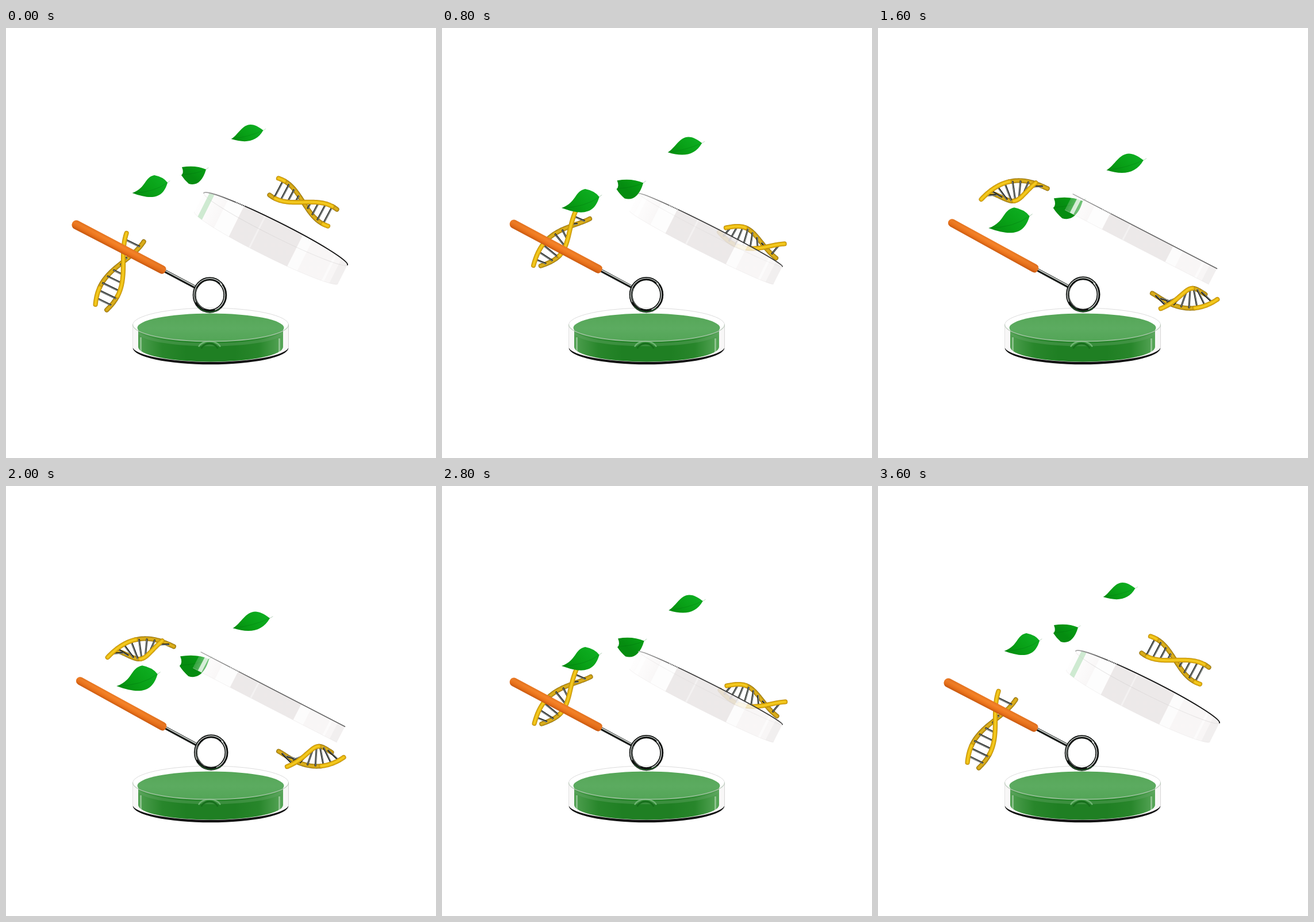
An HTML page with a canvas for the animation above (3.7 s loop, 748 by 748 pixels).

```html
<!DOCTYPE html>
<html lang="en">
<head>
<meta charset="utf-8">
<title>Petri dish</title>
<style>
html, body { margin: 0; width: 100%; height: 100%; overflow: hidden; background: #fff; }
canvas { display: block; }
</style>
</head>
<body>
<canvas width="748" height="748"></canvas>
<script>
const ctx = document.querySelector('canvas').getContext('2d');
const { PI, sin, cos } = Math;
const TAU = PI * 2;
let p = 0; // position in the swing: 0 = start, 1 = far end

// Value between two ends of the swing; bow bends the way between them.
const swing = (a, b, bow = 0) => a + (b - a) * p + bow * p * (1 - p);

function stroke(path, color, width, cap = 'round') {
  ctx.strokeStyle = color;
  ctx.lineWidth = width;
  ctx.lineCap = cap;
  ctx.lineJoin = 'round';
  ctx.stroke(path);
}
function fill(path, color) {
  ctx.fillStyle = color;
  ctx.fill(path);
}
function shine(path, color, width, dy = -1) {
  ctx.save();
  ctx.translate(dy / -2, dy);
  stroke(path, color, width, 'butt');
  ctx.restore();
}
function gradient(x0, y0, x1, y1, ...colors) {
  const g = ctx.createLinearGradient(x0, y0, x1, y1);
  colors.forEach((c, i) => g.addColorStop(i / (colors.length - 1), c));
  return g;
}
function oval(x, y, rx, ry, from = 0, to = TAU) {
  const path = new Path2D();
  path.ellipse(x, y, rx, ry, 0, from, to);
  return path;
}
const line = (x0, y0, x1, y1) => new Path2D(`M${x0} ${y0}L${x1} ${y1}`);

// Double helix: it turns on the page (angle), rolls (phase, in degrees) and leans (lean).
function drawDna(x, y, length, angle, phase, lean) {
  const radius = 17.3, twist = PI * 1.2;
  const psi = s => phase * PI / 180 + twist * s;
  const point = (s, side) => [
    length * s + side * lean * sin(psi(s)),
    side * radius * cos(psi(s))
  ];
  const strands = front => {
    for (const side of [1, -1]) {
      const path = new Path2D();
      let open = false;
      for (let i = -25; i <= 25; i++) {
        const s = i / 50, shown = side * sin(psi(s)) >= 0 === front;
        if (shown) path[open ? 'lineTo' : 'moveTo'](...point(s, side));
        else if (open) path.lineTo(...point(s, side));
        open = shown;
      }
      stroke(path, front ? '#bd8c0a' : '#94720f', 8.2);
      stroke(path, front ? '#e6b60e' : '#cda013', 6.2);
      stroke(path, front ? '#f5cb22' : '#dbb01f', 2.6);
    }
  };
  ctx.save();
  ctx.translate(x, y);
  ctx.rotate(angle * PI / 180);
  strands(false);
  for (let s = -.42; s < .45; s += .105) {
    const rung = line(...point(s, 1), ...point(s, -1));
    stroke(rung, '#1d201e', 3, 'butt');
    shine(rung, '#b4bab6', .9, -.7);
  }
  strands(true);
  ctx.restore();
}

function drawLeaf(x, y, scale, outline, rib) {
  ctx.save();
  ctx.translate(x, y);
  ctx.scale(scale, scale);
  fill(new Path2D(outline), gradient(10, 10, 45, -28, '#058c10', '#08a016', '#0dac20'));
  stroke(new Path2D(rib), 'rgba(0,100,15,.35)', .8);
  ctx.restore();
}

function drawLid() {
  const x = swing(344, 339), y = swing(287, 289);
  const dx = swing(594, 589.5) - x, dy = swing(412, 418.7) - y;
  const len = Math.hypot(dx, dy), r = len / 2, depth = swing(37, 31);
  const bulge = 13 * Math.max(0, 1 - p * 1.12) + .01;
  ctx.save();
  ctx.translate(x, y);
  ctx.rotate(Math.atan2(dy, dx));

  const body = new Path2D();
  body.ellipse(r, 0, r, bulge, 0, PI, TAU);
  body.ellipse(r, depth, r, bulge, 0, 0, PI);
  body.closePath();
  const clear = 'rgba(250,248,248,.2)', haze = 'rgba(246,243,243,.75)';
  fill(body, gradient(0, 0, len, 0, clear, haze, haze, haze, haze, haze, haze));

  ctx.save();
  ctx.clip(body);
  const pane = (from, to, color) => {
    ctx.fillStyle = color;
    ctx.fillRect(from, -bulge, to - from, depth + bulge * 2);
  };
  const right = swing(187, 197);
  pane(10, 17, 'rgba(255,255,255,.75)');
  pane(43, 73, 'rgba(255,255,255,.75)');
  pane(73, right, 'rgba(228,223,223,.55)');
  pane(112, 115, 'rgba(255,255,255,.35)');
  pane(right, right + 19, 'rgba(255,255,255,.65)');
  pane(len - 28, len - 24, 'rgba(255,255,255,.6)');
  pane(len - 14, len, 'rgba(225,220,220,.3)');
  pane(9, 18, `rgba(175,222,180,${Math.max(0, .6 - p * 3)})`);
  stroke(oval(r, 0, r, bulge, 0, PI), `rgba(205,202,202,${.45 * (1 - p)})`, 1);
  ctx.restore();

  stroke(oval(r, depth, r, bulge, 0, PI), 'rgba(225,220,220,.4)', .8);
  const shade = swing(18, 103), dark = `rgb(${shade},${shade},${shade})`;
  stroke(oval(r, 0, r, bulge, PI, TAU), gradient(0, 0, len, 0, '#aaa', dark, dark, dark), swing(1.9, 1.5));
  // glints on the rim
  for (let u = 58; u < 74; u += 3) {
    const v = -bulge * Math.sqrt(1 - (u / r - 1) ** 2);
    stroke(line(u, v - 1.5, u, v + 2), '#eee', 1);
  }
  ctx.restore();
}

function drawDish() {
  const x = 356;
  // glass wall and dark base
  fill(new Path2D('M220 516L220 556A136 29 0 0 0 492 556L492 516A136 29 0 0 1 220 516Z'), '#f8f7f7');
  fill(new Path2D('M220.5 556A135.5 29.3 0 0 0 491.5 556A136 27.2 0 0 1 220.5 556Z'), '#111');

  // medium: side, then top surface
  fill(new Path2D('M230 522L230 555A126 25.5 0 0 0 482 555L482 522Z'),
    gradient(230, 0, 482, 0, '#4f9f50', '#28862b', '#1f7f23', '#1f7f23', '#1f7f23', '#28862b', '#58a659'));
  fill(oval(x, 521.5, 127.5, 25), gradient(0, 497, 0, 547, '#55a658', '#5cab60', '#52a456'));
  fill(new Path2D('M230 528A128 24.5 0 0 0 482 528L482 533A128 25 0 0 1 230 533Z'), 'rgba(100,165,102,.4)');

  // ring mirrored in the glass
  stroke(oval(354, 559, 20, 14, PI + .4, TAU - .4), '#6fb573', 2.4);
  stroke(oval(354, 561, 15, 12, PI + .4, TAU - .4), '#176f1c', 3);

  // reflections on the wall
  ctx.fillStyle = 'rgba(255,255,255,.35)';
  ctx.fillRect(233, 538, 3, 27);
  ctx.fillRect(474, 540, 3, 24);
  stroke(line(220.5, 516, 220.5, 556), '#e2e2e2', 1);
  stroke(line(491.5, 516, 491.5, 556), '#d6d6d6', 1);
  stroke(oval(x, 516, 135.5, 29, PI, TAU), '#dcdcdc', 1);
  stroke(oval(x, 516, 135.5, 29, 0, PI), 'rgba(185,200,185,.9)', 1.2);
}

function drawWand() {
  const x = swing(122.5, 129), y = swing(342.5, 339);
  const endX = swing(271, 272), endY = swing(420, 417.7);
  const ringX = swing(354.5, 356.8), ringY = swing(464.5, 463.5);

  const rod = line(endX, endY, ringX - 26, ringY - 14);
  stroke(rod, '#171a18', 5.5, 'butt');
  shine(rod, '#d6dbd7', 1.7);

  const arc = (d, from, to, color, width) =>
    stroke(oval(ringX, ringY, 26.8 + d, 28.2 + d, from, to), color, width);
  arc(0, 0, TAU, '#0f1210', 6);
  arc(.6, 2.7, 5.6, '#e3e7e4', 1.2);
  arc(-.6, -.8, 1.2, '#eceeed', 1.3);
  arc(-1.8, 2, 3.6, '#9fa6a2', .8);
  arc(1.6, .9, 2.4, '#2c8a37', 1);

  // tapered handle
  const r = swing(8, 6.9), len = Math.hypot(endX - x, endY - y);
  ctx.save();
  ctx.translate(x, y);
  ctx.rotate(Math.atan2(endY - y, endX - x));
  const handle = new Path2D();
  handle.arc(0, 0, r, PI / 2, PI * 1.5);
  handle.lineTo(len, -7.4);
  handle.quadraticCurveTo(len + 7, -7.4, len + 7, 0);
  handle.quadraticCurveTo(len + 7, 7.4, len, 7.4);
  handle.closePath();
  fill(handle, gradient(0, -8, 0, 8, '#e57420', '#f5842a', '#ec741c', '#c4560f'));
  fill(handle, gradient(0, 0, len, 0, 'rgba(190,80,10,.15)', 'rgba(240,120,20,0)', 'rgba(180,70,10,.2)'));
  ctx.restore();
}

function frame(now) {
  const t = Math.floor(now % 3700 / 100) * 100;
  p = (1 - cos(PI * t / 1800)) / 2;
  const sway = -2.2 * sin(PI * t / 900);
  const fall = (p + sin(PI * p / 2) ** 2) / 2;

  ctx.fillStyle = '#fff';
  ctx.fillRect(0, 0, 748, 748);
  drawDish();
  drawDna(swing(195, 237, -26) + sway, 425 - 144 * fall, swing(135, 97),
    swing(116, 172, -30), swing(123, 177), swing(0, 10));
  drawDna(swing(517, 529, 70) + sway, 303 + 171 * fall, swing(115, 95),
    swing(28, -6, 25), swing(270, 141), swing(0, 11));
  drawLeaf(swing(392, 396.5) + sway, swing(193, 249), swing(.88, 1.02),
    'M0 0C19 -12 27 -46 63 -17C50 6 28 9 0 0Z', 'M0 0Q35 -4 63 -17L68 -20');
  drawLeaf(swing(306, 304.5) + sway, swing(242, 298), swing(1, 1.2),
    'M0 0Q24 -4 42 4C36 25 25 33 12 29Q4 22 -1 14Q4 10 0 0Z', 'M1 13Q25 12 42 4L46 1');
  drawLeaf(swing(220, 192), swing(287, 350), swing(1, 1.165),
    'M0 0C25 -10 20 -27 38 -31Q54 -28 61 -18C54 7 37 14 0 0Z', 'M0 0Q38 -1 61 -18L65 -21');
  drawLid();
  drawWand();
  requestAnimationFrame(frame);
}
requestAnimationFrame(frame);
</script>
</body>
</html>
```
